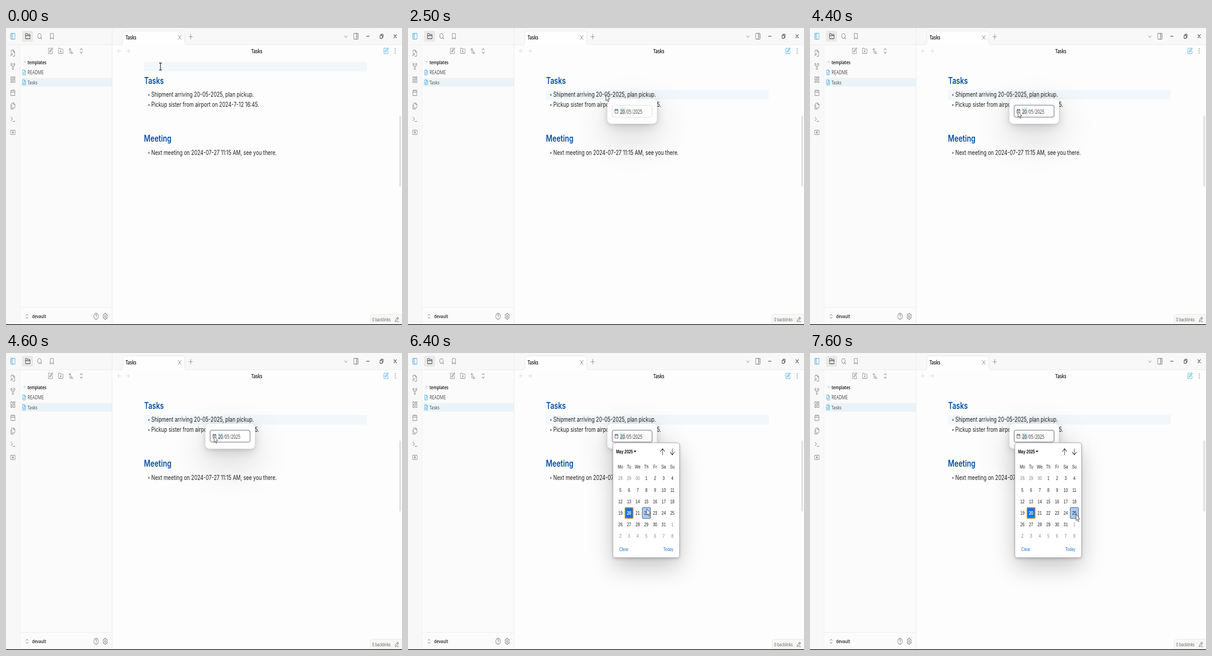
An HTML page with a canvas that plays this animation: 864x648 px, repeating every 8 s.

```html
<!DOCTYPE html>
<html lang="en">
<head>
<meta charset="utf-8">
<title>Tasks</title>
<style>
  html, body { margin: 0; width: 100%; height: 100%; overflow: hidden; background: #fdfdfd; }
  canvas { display: block; }
</style>
</head>
<body>
<canvas id="stage" width="864" height="648"></canvas>
<script>
const ctx = document.getElementById('stage').getContext('2d');
const LOOP = 8000, SQUEEZE = 0.75; // the wide window is shown at 4:3
const UI = '"Open Sans", "Noto Sans", sans-serif';
const BODY = 'Inter, Roboto, sans-serif';
const PICKER = '"Liberation Sans", Arial, sans-serif';
const BLUE = '#48a9e0';

// Outline icons on a 24-unit grid
const ICONS = {
  panelLeft: 'M5 3h14a2 2 0 0 1 2 2v14a2 2 0 0 1-2 2H5a2 2 0 0 1-2-2V5a2 2 0 0 1 2-2zM10 3v18M5.5 7h2M5.5 11h2M5.5 15h2',
  panelRight: 'M5 3h14a2 2 0 0 1 2 2v14a2 2 0 0 1-2 2H5a2 2 0 0 1-2-2V5a2 2 0 0 1 2-2zM14 3v18M16.5 7h2M16.5 11h2M16.5 15h2',
  folder: 'M20 20H4a2 2 0 0 1-2-2V5a2 2 0 0 1 2-2h4l3 3h9a2 2 0 0 1 2 2v10a2 2 0 0 1-2 2zM2 10h20',
  search: 'M19 11a8 8 0 1 1-16 0a8 8 0 1 1 16 0zM21 21l-4.3-4.3',
  bookmark: 'M19 21l-7-4-7 4V5a2 2 0 0 1 2-2h10a2 2 0 0 1 2 2z',
  edit: 'M12 3H5a2 2 0 0 0-2 2v14a2 2 0 0 0 2 2h14a2 2 0 0 0 2-2v-7M18.4 2.6a2.1 2.1 0 0 1 3 3L12 15l-4 1 1-4z',
  folderPlus: 'M20 20H4a2 2 0 0 1-2-2V5a2 2 0 0 1 2-2h4l3 3h9a2 2 0 0 1 2 2v10a2 2 0 0 1-2 2zM12 10v6M9 13h6',
  sort: 'M3 8l4-4 4 4M7 4v16M11 12h4M11 16h7M11 20h10',
  updown: 'M7 15l5 5 5-5M7 9l5-5 5 5',
  fileSearch: 'M14 2v6h6M4 9V4a2 2 0 0 1 2-2h8l6 6v12a2 2 0 0 1-2 2h-6M10 15a3 3 0 1 1-6 0a3 3 0 1 1 6 0zM4.5 17.5L2 21',
  fork: 'M15 19a3 3 0 1 1-6 0a3 3 0 1 1 6 0zM9 5a3 3 0 1 1-6 0a3 3 0 1 1 6 0zM21 5a3 3 0 1 1-6 0a3 3 0 1 1 6 0zM18 8v1a3 3 0 0 1-3 3H9a3 3 0 0 1-3-3V8M12 12v4',
  board: 'M3 3h7v9H3zM14 3h7v5h-7zM14 12h7v9h-7zM3 16h7v5H3z',
  calendar: 'M5 4h14a2 2 0 0 1 2 2v13a2 2 0 0 1-2 2H5a2 2 0 0 1-2-2V6a2 2 0 0 1 2-2zM3 10h18M8 2v4M16 2v4',
  files: 'M15 2v5h5M8 2h8l5 5v9a2 2 0 0 1-2 2H9a2 2 0 0 1-2-2V3zM3 7v13a2 2 0 0 0 2 2h10',
  terminal: 'M4 17l6-6-6-6M12 19h9',
  card: 'M4 5h16a2 2 0 0 1 2 2v10a2 2 0 0 1-2 2H4a2 2 0 0 1-2-2V7a2 2 0 0 1 2-2zM15 12a3 3 0 1 1-6 0a3 3 0 1 1 6 0zM12 10v4',
  file: 'M14 2v6h6M6 2h8l6 6v12a2 2 0 0 1-2 2H6a2 2 0 0 1-2-2V4a2 2 0 0 1 2-2zM8 13h8M8 17h8',
  help: 'M22 12a10 10 0 1 1-20 0a10 10 0 1 1 20 0zM9 9a3 3 0 0 1 6 1c0 2-3 2.5-3 4M12 17v.6',
  gear: 'M10 2h4l.6 3 2 1.2 2.9-1 2 3.5-2.3 2v2.6l2.3 2-2 3.5-2.9-1-2 1.2-.6 3h-4l-.6-3-2-1.2-2.9 1-2-3.5 2.3-2v-2.6l-2.3-2 2-3.5 2.9 1 2-1.2zM15 12a3 3 0 1 1-6 0a3 3 0 1 1 6 0z',
  pencil: 'M16 4l4 4L8 20l-5 1 1-5zM13 7l4 4M13 21h8',
  left: 'M20 12H4M11 5l-7 7 7 7',
  right: 'M4 12h16M13 5l7 7-7 7',
  up: 'M12 21V3M4 11l8-8 8 8',
  down: 'M12 3v18M4 13l8 8 8-8',
  chevron: 'M5 8l7 8 7-8',
  cross: 'M4 4l16 16M20 4L4 20',
  plus: 'M12 3v18M3 12h18',
  minus: 'M3 12h18',
  restore: 'M3 8h13v13H3zM8 8V5a2 2 0 0 1 2-2h9a2 2 0 0 1 2 2v9a2 2 0 0 1-2 2h-3',
  date: 'M4 5h16v16H4zM4 8h16M7 2v3M17 2v3'
};
for (const k in ICONS) ICONS[k] = new Path2D(ICONS[k]);

function icon(name, x, y, color = '#858585', size = 16, weight = 1.7) {
  ctx.save();
  ctx.translate(x, y);
  ctx.scale(size / 24 * SQUEEZE, size / 24);
  ctx.translate(-12, -12);
  ctx.strokeStyle = color;
  ctx.lineWidth = weight;
  ctx.lineCap = ctx.lineJoin = 'round';
  ctx.stroke(ICONS[name]);
  ctx.restore();
}

function text(s, x, y, size, font, color = '#222', weight = 400, align = 'left') {
  ctx.save();
  ctx.translate(x, y);
  ctx.scale(SQUEEZE, 1);
  ctx.font = `${weight} ${size}px ${font}`;
  ctx.textAlign = align;
  ctx.fillStyle = color;
  ctx.fillText(s, 0, 0);
  ctx.restore();
}

function rect(x, y, w, h, fill, r = 0, stroke, line = 1) {
  ctx.beginPath();
  ctx.roundRect(x, y, w, h, r);
  if (fill) { ctx.fillStyle = fill; ctx.fill(); }
  if (stroke) { ctx.strokeStyle = stroke; ctx.lineWidth = line; ctx.stroke(); }
}

function shadowed(x, y, w, h, r, layers) {
  for (const [dy, blur, alpha] of layers) {
    ctx.save();
    ctx.shadowColor = `rgba(0,0,0,${alpha})`;
    ctx.shadowBlur = blur;
    ctx.shadowOffsetY = dy;
    rect(x, y, w, h, '#fff', r);
    ctx.restore();
  }
}

function frame() {
  rect(0, 0, 864, 648, '#fdfdfd');
  rect(0, 0, 864, 36, '#f8f8f8');
  rect(0, 36, 30, 612, '#f8f8f8');
  rect(30, 36, 201, 612, '#fbfbfb');
  rect(0, 36, 864, 1, '#ebebea');
  rect(30, 37, 1, 611, '#f0f0ef');
  rect(231, 0, 1, 648, '#e9e9e8');

  // Active tab with flared feet
  ctx.beginPath();
  ctx.moveTo(249, 37);
  ctx.quadraticCurveTo(255, 37, 255, 30);
  ctx.lineTo(255, 12);
  ctx.quadraticCurveTo(255, 6.5, 260, 6.5);
  ctx.lineTo(385, 6.5);
  ctx.quadraticCurveTo(390, 6.5, 390, 12);
  ctx.lineTo(390, 30);
  ctx.quadraticCurveTo(390, 37, 396, 37);
  ctx.fillStyle = '#fefefe';
  ctx.fill();
  ctx.strokeStyle = '#e6e6e5';
  ctx.lineWidth = 1;
  ctx.stroke();

  text('Tasks', 261, 24.7, 12, UI, '#111', 600);
  icon('cross', 379, 20.5, '#555', 13, 1.6);
  icon('plus', 403, 19, '#777', 14);
  icon('panelLeft', 15, 18, BLUE, 17);
  rect(35, 6, 24, 24, '#e9e9e8', 4);
  icon('folder', 47.5, 18, '#333');
  icon('search', 73.5, 18, '#777');
  icon('bookmark', 100, 18, '#777');
  icon('chevron', 741.5, 19, '#777', 13);
  icon('panelRight', 763.5, 18, '#777', 17);
  icon('minus', 789.5, 18, '#111', 11, 2.4);
  icon('restore', 819.5, 18, '#111', 12, 2.2);
  icon('cross', 849, 18, '#111', 11, 2.4);

  ['fileSearch', 'fork', 'board', 'calendar', 'files', 'terminal', 'card']
    .forEach((n, i) => icon(n, 15, 55 + 28.8 * i));
  ['edit', 'folderPlus', 'sort', 'updown'].forEach((n, i) => icon(n, 97 + 22.4 * i, 50));

  rect(33, 109, 198, 19, '#eaf3f7', 2);
  icon('right', 40, 74, '#74bfe8', 8, 2.4);
  text('templates', 47, 79, 11.3, UI, '#111', 600);
  icon('file', 39.5, 97, BLUE, 13, 2);
  text('README', 47, 101, 11.8, UI, '#444');
  icon('file', 39.5, 118.5, BLUE, 13, 2);
  text('Tasks', 47, 122.5, 11.5, UI, '#444');

  rect(30, 609, 201, 1, '#ececeb');
  icon('updown', 46, 629, '#666', 14);
  text('devault', 57, 633, 11.3, UI, '#222', 600);
  icon('help', 196.5, 629, '#777');
  icon('gear', 216.5, 629, '#777');

  icon('left', 247, 50, '#cacaca', 14);
  icon('right', 266, 50, '#cacaca', 14);
  text('Tasks', 547.3, 54.7, 12.2, UI, '#111', 600, 'center');
  icon('edit', 829, 50, BLUE);
  for (const dy of [-4.5, 0, 4.5]) rect(848.3, 49 + dy, 1.6, 2, '#555', 0.8);
  rect(858, 191, 4, 155, '#e2e2e2', 2);
}

function note(activeY) {
  rect(301, activeY, 486, 21, '#f1f7fa');
  text('Tasks', 301.5, 121.7, 20.2, BODY, '#0550a6', 600);
  text('Meeting', 301, 248.2, 20.2, BODY, '#0550a6', 600);
  const items = [
    [150, 'Shipment arriving 20-05-2025, plan pickup.'],
    [172, 'Pickup sister from airport on 2024-7-12 16:45.'],
    [276.5, 'Next meeting on 2024-07-27 11:15 AM, see you there.']
  ];
  for (const [y, s] of items) {
    ctx.beginPath();
    ctx.ellipse(311.7, y - 4, 1.7, 2.2, 0, 0, 7);
    ctx.fillStyle = '#868686';
    ctx.fill();
    text(s, 317, y, 14.42, BODY);
  }
}

function statusBar() {
  rect(794.5, 624.5, 75, 30, '#f7f7f6', 5, '#e8e8e7');
  text('0 backlinks', 799, 640, 10.5, UI, '#585858');
  icon('pencil', 853, 635.5, '#555', 14);
  rect(0, 646.5, 864, 1.5, '#111');
}

function dateField(focused) {
  shadowed(435, 154, 108, 55, 10, [[2, 7, 0.1], [6, 22, 0.14], [28, 80, 0.2]]);
  rect(435, 154, 108, 55, '#fefefe', 10);
  rect(445.5, 168.5, 87, 26, '#fff', 4, focused ? '#a3a6b4' : '#d9d9dc', focused ? 2 : 1);
  rect(462, 174, 12, 15, '#d9eaee');
  icon('date', 455, 181.5, '#444', 12, 2);
  text('20', 463, 186.5, 11.7, UI, '#333');
  text('/', 474.2, 186.5, 11.7, UI, '#777');
  text('05', 477.3, 186.5, 11.7, UI, '#333');
  text('/', 488.2, 186.5, 11.7, UI, '#777');
  text('2025', 491.3, 186.5, 11.7, UI, '#333');
}

const COL = 18.9, ROW = 25.2;
function calendar(x, y) {
  shadowed(447, 196, 145.5, 251, 5, [[2, 6, 0.2], [20, 50, 0.22]]);
  rect(447, 196, 145.5, 250.5, '#fff', 5, '#a2a2a2');
  text('May 2025', 454, 218.5, 11, PICKER, '#111', 700);
  ctx.beginPath();
  ctx.moveTo(492.5, 213);
  ctx.lineTo(498, 213);
  ctx.lineTo(495.2, 217);
  ctx.fillStyle = '#111';
  ctx.fill();
  icon('up', 555.5, 215.5, '#222', 18, 1.6);
  icon('down', 576.7, 215.5, '#222', 18, 1.6);
  ['Mo', 'Tu', 'We', 'Th', 'Fr', 'Sa', 'Su'].forEach((d, i) =>
    text(d, 463.4 + COL * i, 252, 11, PICKER, '#222', 400, 'center'));

  const hoverCol = Math.floor((x - 454) / COL), hoverRow = Math.floor((y - 261) / ROW);
  for (let i = 0; i < 42; i++) {
    const c = i % 7, r = Math.floor(i / 7);
    const cx = 463.4 + COL * c, cy = 273.4 + ROW * r;
    const n = i - 2;
    const day = n < 1 ? n + 30 : n > 31 ? n - 31 : n;
    const outside = n < 1 || n > 31, picked = n === 20;
    if (picked) rect(cx - 8.6, cy - 11.5, 17.2, 23, '#0b75f2', 1, '#c08d2c', 1.8);
    else if (c === hoverCol && r === hoverRow)
      rect(cx - 9, cy - 12, 18, 24, '#a9cbf3', 2, '#3c4a60');
    text(day, cx, cy + 4, 11, PICKER, picked ? '#fff' : outside ? '#808080' : '#181818',
      picked ? 700 : 400, 'center');
  }
  text('Clear', 461, 431.5, 11.1, PICKER, '#1a73c8');
  text('Today', 579, 431.5, 11, PICKER, '#1a73c8', 400, 'right');
}

function iBeam(x, y) {
  ctx.beginPath();
  ctx.moveTo(x - 3, y - 7.5);
  ctx.lineTo(x + 3, y - 7.5);
  ctx.moveTo(x, y - 7.5);
  ctx.lineTo(x, y + 7.5);
  ctx.moveTo(x - 3, y + 7.5);
  ctx.lineTo(x + 3, y + 7.5);
  ctx.strokeStyle = '#222';
  ctx.lineWidth = 1.3;
  ctx.stroke();
}

const ARROW = new Path2D('M0 0V13.6L2.6 11 4.5 15.8 6.4 15 4.5 10.4 8 10.1Z');
function arrow(x, y) {
  ctx.save();
  ctx.translate(x, y);
  ctx.fillStyle = '#fff';
  ctx.fill(ARROW);
  ctx.strokeStyle = '#444';
  ctx.lineWidth = 1;
  ctx.stroke(ARROW);
  ctx.restore();
}

// Pointer stops: time, x, y
const PATH = [
  [0, 337, 84], [900, 337, 84], [1500, 410.5, 135], [1900, 432, 145], [3000, 432, 145],
  [3900, 454, 182], [4800, 454, 181], [5400, 473, 253], [5900, 476, 278],
  [6400, 521, 340], [6800, 538, 352], [7200, 584, 359], [7600, 580.5, 352], [LOOP, 580.5, 352]
];
function pointer(t) {
  const i = PATH.findIndex(p => p[0] > t);
  const [t0, x0, y0] = PATH[i - 1], [t1, x1, y1] = PATH[i];
  const u = (t - t0) / (t1 - t0), e = u * u * (3 - 2 * u);
  return [x0 + (x1 - x0) * e, y0 + (y1 - y0) * e];
}

function draw(now) {
  const t = Math.floor(now % LOOP / 100) * 100;
  const [x, y] = pointer(t);
  const opened = t >= 2200;
  frame();
  note(opened ? 135 : 74);
  statusBar();
  if (!opened && (t + 1000) % 1200 < 600) rect(301, 76, 1.2, 17, '#222');
  if (opened) dateField(t >= 4200);
  if (t >= 5000) calendar(x, y);
  (opened ? arrow : iBeam)(x, y);
  requestAnimationFrame(draw);
}
requestAnimationFrame(draw);
</script>
</body>
</html>
```
